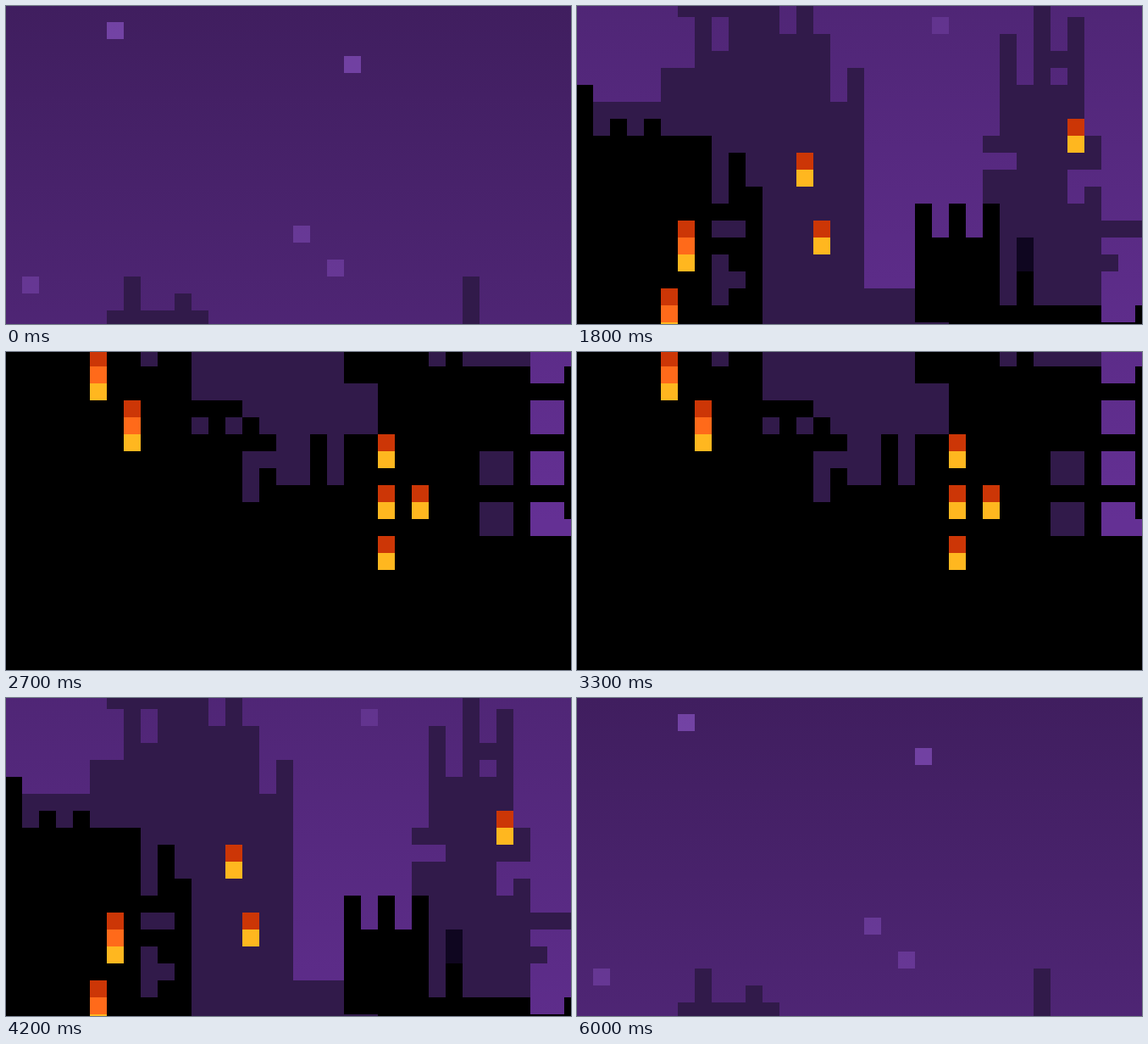
Recreate the animation shown at these times as an HTML page with a canvas. Size 667 by 375 pixels, loop 6300 ms.

```html
<!DOCTYPE html>
<html>
<head>
<meta charset="utf-8">
<title>Night city</title>
<style>
html, body { margin: 0; height: 100%; overflow: hidden; background: #000; }
canvas { display: block; }
</style>
</head>
<body>
<canvas id="stage" width="667" height="375"></canvas>
<script>
const ctx = document.getElementById('stage').getContext('2d');
const CELL = 20, COLS = 34, ROWS = 60, STEP = 300, TURN = 10;
const WIDTH = 667, HEIGHT = 375;
const DARK = '#311a4a', BLACK = '#000', SKY = null;
const RED = '#cc3606', ORANGE = '#ff6a1a', YELLOW = '#ffb71f';

const sky = ctx.createLinearGradient(0, 0, 0, 940);
sky.addColorStop(0, '#401e5f');
sky.addColorStop(1, '#643094');

// All shapes are placed in cells; SKY cuts a hole.
function block(color, col, row, w = 1, h = 1) {
  const box = [col * CELL - 1, row * CELL - 1, w * CELL, h * CELL];
  ctx.fillStyle = color;
  if (color) ctx.fillRect(...box);
  else ctx.clearRect(...box);
}

const tower = (color, col, top, w = 1) => block(color, col, top, w, ROWS - top);

function battlement(col, top, rise, w) {
  for (let i = 0; i < 3; i++) tower(BLACK, col + 2 * i, top);
  tower(BLACK, col, top + rise, w);
}

function lamp(col, row, ...colors) {
  colors.forEach((color, i) => block(color, col, row + i));
}
const lantern = (col, row) => lamp(col, row, RED, YELLOW);
const torch = (col, row) => lamp(col, row, RED, ORANGE, YELLOW);

// Stars fade towards the horizon.
function star(col, row) {
  block(`rgba(175,110,245,${0.47 - 0.0135 * row})`, col, row);
}

function farLeft() {
  tower(DARK, 7, 16);
  tower(DARK, 10, 17);
  tower(DARK, 7, 18, 5);
  tower(DARK, 13, 19);
  tower(DARK, 12, 22, 3);
  tower(DARK, 5, 24, 10);
  tower(DARK, 16, 24);
  tower(DARK, 0, 26, 17);
  for (const row of [18, 20]) block(DARK, 6, row);
  block(SKY, 8, 19);
  block(SKY, 8, 21, 1, 2);
}

function farRight() {
  [22, 16, 21].forEach((top, i) => tower(DARK, 25 + 2 * i, top));
  tower(DARK, 27, 23, 3);
  tower(DARK, 25, 25, 5);
  tower(DARK, 24, 28, 7);
  block(SKY, 28, 24);
  block(SKY, 24, 29, 2);
  block(SKY, 29, 30, 2);
  block(SKY, 29, 31);
  block(DARK, 31, 33, 3);
  block(DARK, 31, 35);
  block('#0f0620', 26, 34, 1, 2);
}

function nearWalls() {
  tower(BLACK, 0, 25);
  battlement(0, 27, 1, 8);
  tower(BLACK, 9, 29);
  tower(BLACK, 10, 31);
  tower(BLACK, 0, 32, 11);
  battlement(20, 32, 2, 5);
  tower(BLACK, 26, 36);
  tower(BLACK, 0, 37, COLS);
}

function openings() {
  // Slits in the left wall
  block(DARK, 8, 33, 2);
  block(DARK, 8, 35, 1, 3);
  block(DARK, 9, 36);
  // Ragged breach in the middle
  block(DARK, 11, 37, 9, 3);
  block(DARK, 14, 39, 8, 3);
  block(BLACK, 14, 41);
  for (const col of [11, 13]) block(DARK, col, 41);
  block(DARK, 16, 42, 2, 3);
  block(DARK, 19, 42, 1, 3);
  block(DARK, 14, 43, 2);
  block(DARK, 14, 43, 1, 3);
  // Rows of windows on the right
  block(DARK, 25, 37);
  block(DARK, 27, 37, 4);
  for (let row = 37; row <= 46; row += 3) {
    block(SKY, 31, row, 2, 2);
    if (row > 40) block(DARK, 28, row, 2, 2);
  }
  for (const row of [37, 47]) block(SKY, 33, row);
}

function lights() {
  for (const [col, row] of [[6, 33], [5, 37], [7, 40]]) torch(col, row);
  for (const [col, row] of [[13, 29], [14, 33], [29, 27], [24, 45]]) lantern(col, row);
  for (let row = 42; row <= 48; row += 3) lantern(22, row);
}

function draw(top) {
  ctx.setTransform(1, 0, 0, 1, 0, 0);
  ctx.clearRect(0, 0, WIDTH, HEIGHT);
  ctx.translate(0, -top);
  for (const [col, row] of [[6, 1], [20, 3], [17, 13], [19, 15], [1, 16], [21, 21]]) star(col, row);
  farLeft();
  farRight();
  nearWalls();
  openings();
  lights();
  // The sky goes behind everything, showing through the holes.
  ctx.globalCompositeOperation = 'destination-over';
  ctx.fillStyle = sky;
  ctx.fillRect(0, top, WIDTH, HEIGHT);
  ctx.globalCompositeOperation = 'source-over';
}

// A gentle start, then a fast drop that eases out.
const depth = k => k <= TURN / 2 ? k * (19.5 + 3.5 * k) : 806 - 16 * (TURN + 1 - k) ** 2;

const start = performance.now();
function tick() {
  const step = Math.floor((performance.now() - start) / STEP) % (2 * TURN + 1);
  draw(depth(TURN - Math.abs(TURN - step)));
  requestAnimationFrame(tick);
}
tick();
</script>
</body>
</html>
```
